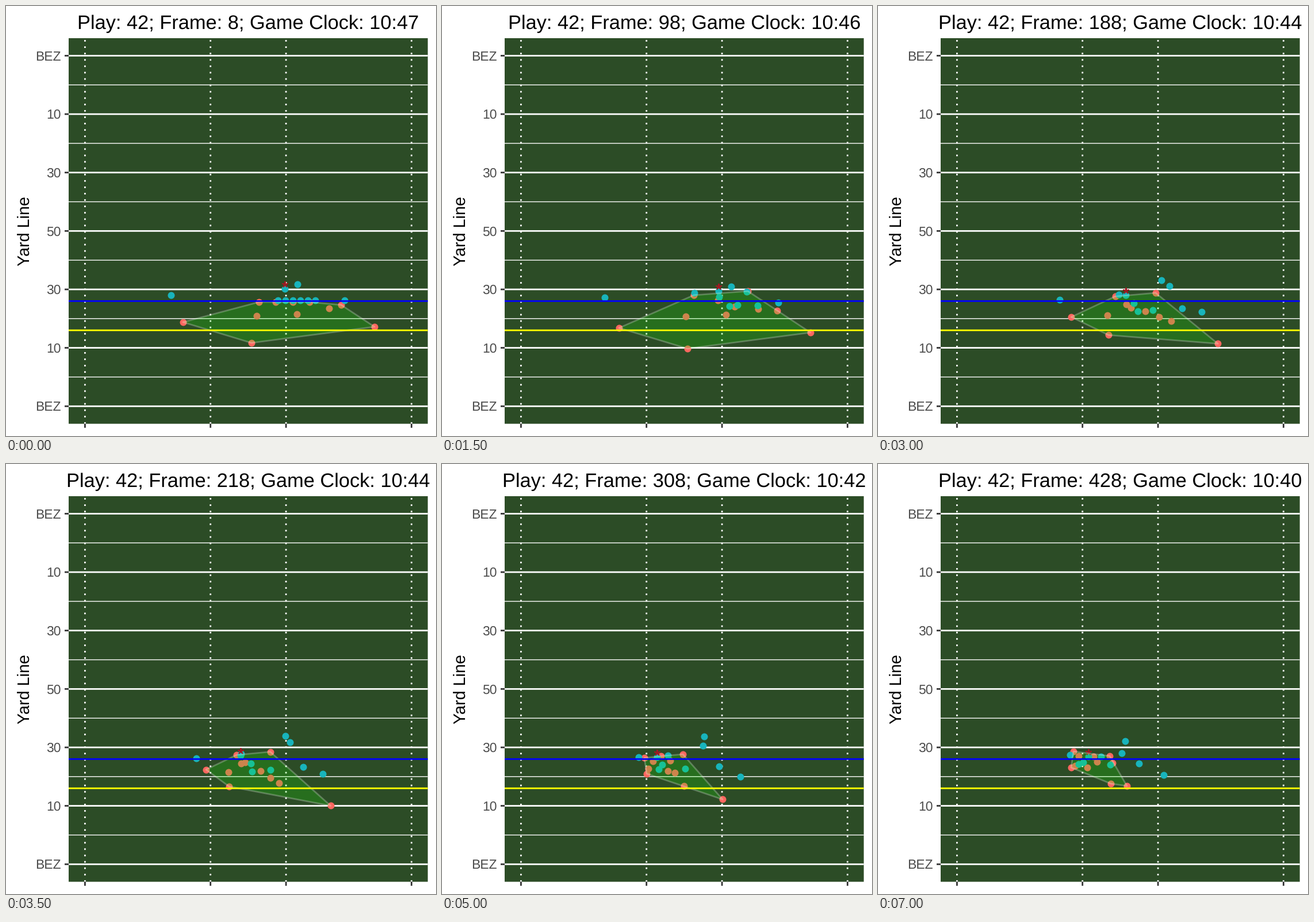
These frames come from a looping animation (748 by 748 pixels, 7.5 s). A matplotlib script:

```python
import matplotlib.pyplot as plt
import numpy as np
from matplotlib.animation import FuncAnimation
from matplotlib.patches import Polygon, Rectangle

SIZE, DPI = 748, 100
PX = 72 / DPI
STEPS, STEP_MS = 15, 500
LEFT, RIGHT, TOP, BOTTOM = 109, 733.7, 56, 726.7
FIRST_YARD, YARD_STEP = 86.45, 101.63
HASHES = [137.4, 355.7, 487.1, 705.4]
THICK, THIN = 2.77, 1.39
SNAP, PURSUIT, TACKLE = 3, 8, 13

plt.rcParams.update({"font.family": "Liberation Sans", "text.hinting": "no_hinting"})


def ease(u):
    u = min(max(u, 0), 1)
    return u * u * (3 - 2 * u)


class Squad:
    """Players running from a formation through three key points each."""

    def __init__(self, routes, start=None, shift=(0, 0)):
        self.snap, self.mid, self.end = np.array(routes, float).transpose(1, 0, 2)
        self.start = self.snap + shift if start is None else start

    def at(self, t):
        if t <= SNAP:
            return self.start + (self.snap - self.start) * ease(t / SNAP)
        drift = (self.end - self.snap) / (TACKLE - SNAP)
        if t <= PURSUIT:
            h = PURSUIT - SNAP
            u = (t - SNAP) / h
            return self.snap + (self.mid - self.snap) * ease(u) + drift * h * u * u * (u - 1)
        h = TACKLE - PURSUIT
        u = min((t - PURSUIT) / h, 1)
        return self.mid + (self.end - self.mid) * ease(u) + drift * h * u * (1 - u) ** 2


def lineup(x0, x1, count, y):
    return np.column_stack([np.linspace(x0, x1, count), np.full(count, y)])


secondary = Squad([
    [(308, 560), (355, 524), (340, 500)],
    [(427, 596), (377, 552), (336, 528)],
    [(583, 530), (450, 560), (405, 556)],
    [(641, 568), (541, 597), (433, 560)],
], shift=(0, -10))
linebackers = Squad([
    [(424, 540), (377, 535), (343, 525)],
    [(494, 537), (401, 516), (408, 520)],
    [(550, 527), (437, 548), (381, 518)],
], shift=(12, -1))
rush = Squad([
    [(438, 503), (392, 507), (375, 509)],
    [(480, 512), (391, 522), (349, 508)],
    [(509, 523), (425, 536), (364, 528)],
    [(532, 496), (442, 502), (403, 508)],
], start=lineup(440, 528, 4, 515))
backs = Squad([
    [(481, 496), (391, 509), (366, 509)],
    [(283, 507), (340, 513), (334, 506)],
    [(503, 488), (479, 471), (430, 482)],
    [(585, 516), (541, 543), (497, 541)],
], shift=(4, -4))
blockers = Squad([
    [(439, 499), (402, 505), (388, 509)],
    [(482, 506), (411, 524), (357, 519)],
    [(500, 522), (409, 536), (349, 522)],
    [(514, 520), (446, 534), (404, 523)],
    [(530, 497), (482, 483), (424, 503)],
    [(549, 521), (507, 528), (454, 521)],
], start=lineup(473, 538, 6, 512))


def convex_hull(points):
    pts = sorted(map(tuple, points))

    def half(seq):
        out = []
        for x, y in seq:
            while len(out) > 1:
                (px, py), (qx, qy) = out[-2:]
                if (qx - px) * (y - py) - (qy - py) * (x - px) > 0:
                    break
                out.pop()
            out.append((x, y))
        return out[:-1]

    return half(pts) + half(pts[::-1])


fig = plt.figure(figsize=(SIZE / DPI, SIZE / DPI), dpi=DPI, facecolor="white")
ax = fig.add_axes([0, 0, 1, 1])
ax.set(xlim=(0, SIZE), ylim=(SIZE, 0))
ax.axis("off")


def stroke(xs, ys, color, width, z=1, **kw):
    ax.plot(xs, ys, color=color, lw=width * PX, zorder=z, snap=False,
            solid_capstyle="butt", dash_capstyle="butt", **kw)


def across(y, color, width, z=1):
    stroke([LEFT, RIGHT], [y, y], color, width, z)


def label(x, y, s, size, color="black", **kw):
    return ax.text(x, y, s, fontsize=size * PX, color=color, va="baseline", **kw)


def dots(color, z):
    return ax.plot([], [], "o", ms=12 * PX, mew=0, color=color, zorder=z, snap=False)[0]


ax.add_patch(Rectangle((LEFT, TOP), RIGHT - LEFT, BOTTOM - TOP, fc="#2C4C26", lw=0,
                       zorder=0, snap=False))
for i, name in enumerate(["BEZ", "10", "30", "50", "30", "10", "BEZ"]):
    y = FIRST_YARD + i * YARD_STEP
    across(y, "white", THICK)
    if i < 6:
        across(y + YARD_STEP / 2, "white", THIN)
    stroke([LEFT - 7, LEFT], [y, y], "#333333", THICK)
    label(96, y + 8.2, name, 22.9, "#4D4D4D", ha="right")
for x in HASHES:
    stroke([x, x], [BOTTOM, TOP], "white", THICK, linestyle=(0, (1, 3)))
    stroke([x, x], [BOTTOM, BOTTOM + 7], "#333333", THICK)
across(FIRST_YARD + 4.2 * YARD_STEP, "#0000FF", THICK, 6)
across(FIRST_YARD + 4.7 * YARD_STEP, "#FFFF00", THICK, 6)
label(40.3, 391.5, "Yard Line", 28.7, ha="center", rotation=90, rotation_mode="anchor")

title = label((LEFT + RIGHT) / 2, 39.6, "", 34.4, ha="center")
red_dots = dots("#FB675F", 2)
cyan_dots = dots("#18B4BC", 3)
ball, = ax.plot([], [], marker=(5, 2, 0), ms=11 * PX, mew=2 * PX, color="#A01822", zorder=4)
hull = Polygon([(0, 0), (1, 0), (0, 1)], closed=True, fc=(0.09, 0.98, 0, 0.2),
               ec=(1, 1, 1, 0.25), lw=THICK * PX, joinstyle="round", zorder=5)
ax.add_patch(hull)


def draw(i):
    title.set_text(f"Play: 42; Frame: {8 + 30 * i}; Game Clock: 10:{47 - i // 2}")
    defense = np.vstack([squad.at(i) for squad in (secondary, linebackers, rush)])
    offense = np.vstack([squad.at(i) for squad in (backs, blockers)])
    red_dots.set_data(*defense.T)
    cyan_dots.set_data(*offense.T)
    hull.set_xy(convex_hull(defense))
    # The ball stays just behind the quarterback, first among the backs.
    x, y = offense[0]
    ball.set_data([x], [y - 8])
    return title, red_dots, cyan_dots, ball, hull


anim = FuncAnimation(fig, draw, frames=STEPS, interval=STEP_MS, repeat=True, repeat_delay=0)
plt.show()
```
